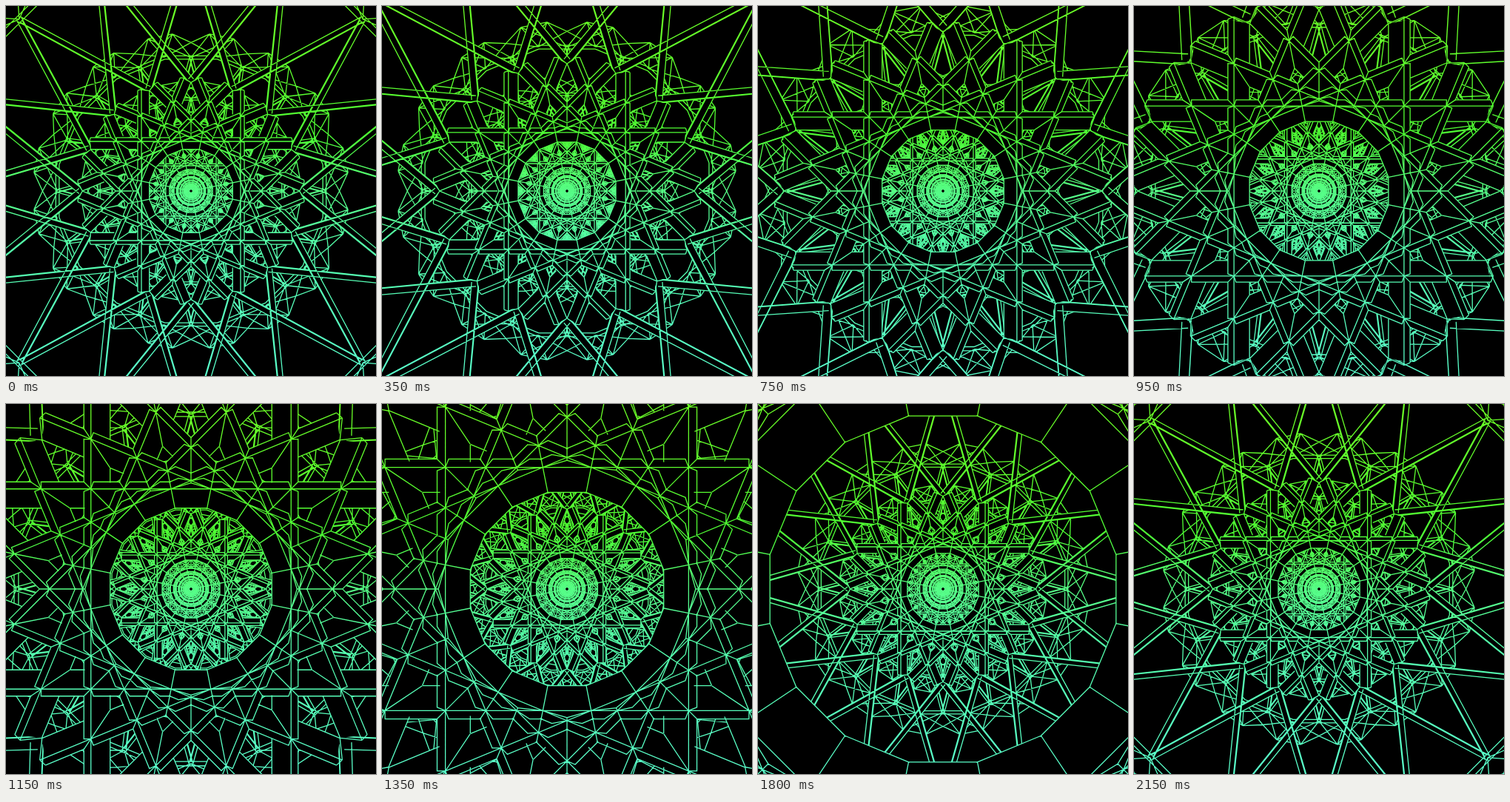
An HTML page with a canvas for the animation above (2.2 s loop, 500 by 500 pixels).

```html
<!DOCTYPE html>
<html lang="en">
<head>
<meta charset="utf-8">
<title>Star tunnel</title>
<style>
  html, body { margin: 0; width: 100%; height: 100%; overflow: hidden; background: #000; }
  canvas { display: block; width: 500px; height: 500px; }
</style>
</head>
<body>
<canvas id="stage" width="500" height="500"></canvas>
<script>
const ctx = document.getElementById('stage').getContext('2d');
const LOOP = 2200, STEP = 50, DEPTH = 24, SIDES = 16;
const TURN = 2 * Math.PI / SIDES;

// Cross-section of one star beam: distance from the axis, depth, half length.
const INNER = { u: 133300, z: 2370, v: 321000 };
const RIDGE = { u: 152700, z: 2279, v: 313000 };
const OUTER = { u: 165000, z: 2290, v: 311000 };
const FACES = [[INNER, RIDGE], [RIDGE, OUTER]];

const polar = (r, k, z) => [r * Math.sin(k * TURN), -r * Math.cos(k * TURN), z];
const mix = (p, q, k) => p.map((c, i) => c + (q[i] - c) * k);
const spin = (p, i) => {
  const c = Math.cos(i * TURN), s = Math.sin(i * TURN);
  return [p[0] * c - p[1] * s, p[0] * s + p[1] * c, p[2]];
};
const spinAll = shapes => {
  const out = [];
  for (let i = 0; i < SIDES; i++)
    for (const s of shapes) out.push(s.map(p => spin(p, i)));
  return out;
};
const onBeam = (edge, side) => [side * edge.v, -edge.u, edge.z];

// Is a point of the star covered by another beam, seen from the axis?
const EYE = 1000;
function hidden(p) {
  const z = p[2] - EYE;
  for (let i = 0; i < SIDES; i++) {
    const q = spin(p, -i), s = -q[1] / z, w = q[0] / z;
    for (const [a, b] of FACES) {
      const za = a.z - EYE, dz = b.z - a.z;
      const k = (s * za - a.u) / (b.u - a.u - s * dz);
      if (k < 0 || k > 1) continue;
      const hit = za + dz * k;
      if (hit < z - 0.6 && Math.abs(w * hit) < a.v + (b.v - a.v) * k) return true;
    }
  }
  return false;
}

function visibleParts(a, b) {
  const n = 400, parts = [];
  let start = -1;
  for (let i = 0; i <= n; i++) {
    const seen = i < n && !hidden(mix(a, b, (i + 0.5) / n));
    if (seen && start < 0) start = i;
    if (!seen && start >= 0) {
      parts.push([mix(a, b, start / n), mix(a, b, i / n)]);
      start = -1;
    }
  }
  return parts;
}

// Lines where the faces of two beams cut each other.
function valleys() {
  const lines = [];
  const at = (f, z) => f[0].u + (f[1].u - f[0].u) * (z - f[0].z) / (f[1].z - f[0].z);
  for (let j = 1; j < 8; j++) for (const f of FACES) for (const g of FACES) {
    const low = RIDGE.z;
    const high = Math.min(Math.max(f[0].z, f[1].z), Math.max(g[0].z, g[1].z));
    const [a, b] = [low, high].map(z => {
      const u = at(f, z), w = at(g, z);
      return [(w - u * Math.cos(j * TURN)) / Math.sin(j * TURN), -u, z];
    });
    if (Math.abs(a[0]) < RIDGE.v) lines.push([a, b]);
  }
  return lines;
}

const edges = [INNER, RIDGE, OUTER].map(e => [onBeam(e, -1), onBeam(e, 1)]);
const caps = [];
for (const side of [-1, 1])
  for (const [a, b] of FACES) caps.push([onBeam(a, side), onBeam(b, side)]);
const starLines = spinAll([...edges, ...caps, ...valleys()].flatMap(([a, b]) => visibleParts(a, b)));
const starFills = spinAll([[onBeam(INNER, -1), onBeam(INNER, 1), onBeam(OUTER, 1), onBeam(OUTER, -1)]]);

// Outer cage: struts from the star points to the tips, then a scalloped rim.
const tip = k => polar(880000, k, 2680);
const node = k => polar(900000, k, 2680);
const crest = k => polar(1065000, k, 2785);
const dip = k => polar(1000000, k, 2785);
const strutFills = [], cage = [];
for (const side of [-1, 1]) {
  const a = polar(345000, 0, 2320), b = tip(side);
  const dx = b[0] - a[0], dy = b[1] - a[1], len = Math.hypot(dx, dy);
  const shift = (p, w, z) => [p[0] - dy / len * w, p[1] + dx / len * w, p[2] + z];
  const rail = (w, z) => [shift(a, w, z), shift(b, w, z)];
  const left = rail(-10000, 0), right = rail(10000, 0);
  strutFills.push([left[0], left[1], right[1], right[0]]);
  cage.push(left, right, rail(side * 5000, 30));
  cage.push([dip(0), crest(side * 0.3)], [node(side * 0.5), crest(side * 0.3)]);
  cage.push([tip(0), crest(side * 0.3)], [tip(0), crest(side * 0.7)]);
  cage.push([node(side * 0.5), dip(0)]);
}
cage.push([crest(0.3), crest(0.7)]);
for (const k of [0.985, 1.01]) {
  const scale = p => [p[0] * k, p[1] * k, p[2]];
  cage.push([scale(node(-0.5)), scale(node(0.5))]);
}
const cageLines = spinAll(cage), cageFills = spinAll(strutFills);

const ink = ctx.createLinearGradient(0, 0, 0, 500);
ink.addColorStop(0, '#6cff26');
ink.addColorStop(0.35, '#4eff34');
ink.addColorStop(0.5, '#56ff86');
ink.addColorStop(0.65, '#54ffac');
ink.addColorStop(1, '#5affcc');

function trace(shapes, shift) {
  ctx.beginPath();
  for (const s of shapes) {
    s.forEach((p, i) => {
      const z = p[2] + shift, x = 250 + p[0] / z, y = 250 + p[1] / z;
      if (i) ctx.lineTo(x, y); else ctx.moveTo(x, y);
    });
  }
}
function fill(shapes, shift) {
  // Each shape is filled alone so that opposite windings never cancel.
  for (const s of shapes) { trace([s], shift); ctx.fill(); }
}
function stroke(shapes, shift) {
  trace(shapes, shift);
  ctx.stroke();
}

function draw(t) {
  ctx.fillStyle = '#000';
  ctx.fillRect(0, 0, 500, 500);
  ctx.strokeStyle = ink;
  ctx.lineWidth = 1.3;
  for (let n = DEPTH - 1; n >= 0; n--) {
    const shift = n * LOOP - t;
    fill(cageFills, shift);
    stroke(cageLines, shift);
    fill(starFills, shift);
    stroke(starLines, shift);
  }
}

const begin = performance.now();
let shown = -1;
function tick() {
  const t = Math.floor((performance.now() - begin) % LOOP / STEP) * STEP;
  if (t !== shown) draw(shown = t);
  requestAnimationFrame(tick);
}
tick();
</script>
</body>
</html>
```
